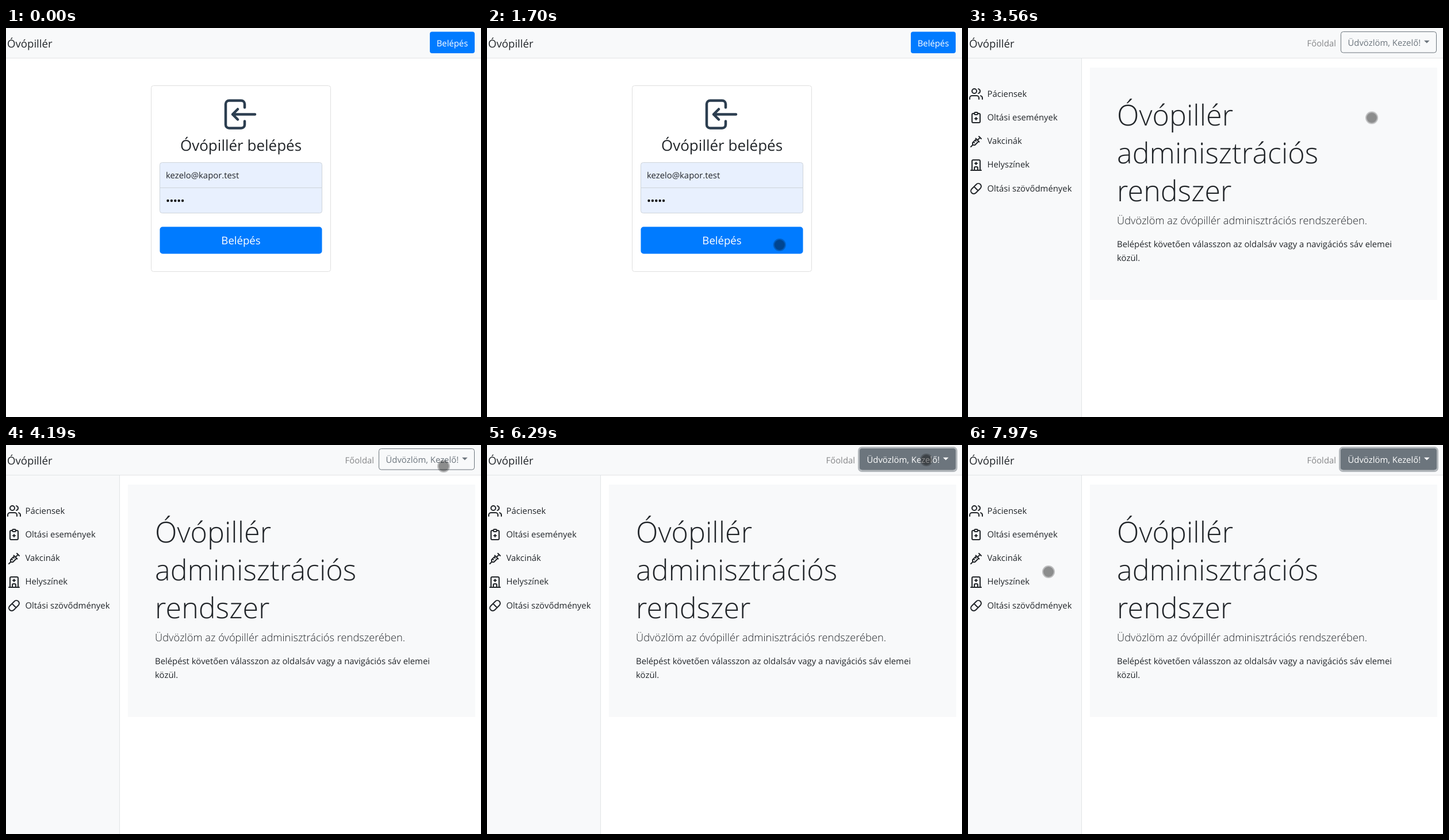
Animation of 826x678 px, one loop 8000 ms. Source, as an HTML page:

```html
<!DOCTYPE html>
<html lang="hu">
<head>
<meta charset="utf-8">
<title>Óvópillér</title>
<style>
  html, body { margin: 0; width: 100%; height: 100%; overflow: hidden; background: #fff; }
  svg { display: block; width: 826px; height: 678px; }
  text { font: 14.86px "Open Sans", "Noto Sans", sans-serif; fill: #212529; text-rendering: geometricPrecision; }
  .mid { text-anchor: middle; }
  .white { fill: #fff; }
  .brand, .big { font-size: 18.6px; }
  .h3 { font-size: 26px; }
  .title { font-size: 50.3px; font-weight: 300; }
  .lead { font-size: 18.3px; font-weight: 300; }
  .link { fill: #858688; }
  .pale { fill: #f8f9fa; }
  .blue { fill: #007bff; }
  .rule { fill: #e2e4e6; }
  .field { fill: #e8f0fe; stroke: #ced4da; }
  .icon { fill: none; stroke: #212529; stroke-width: 2; stroke-linecap: round; stroke-linejoin: round; }

  .login, .home, .menu, .cursor { animation: 8s step-end infinite; }
  .login { animation-name: leave; }
  .home { animation-name: enter; }
  .menu { animation-name: menu; }
  .cursor { animation-name: appear; }
  @keyframes leave { 0% { opacity: 1 } 28%, 100% { opacity: 0 } }
  @keyframes enter { 0% { opacity: 0 } 28%, 100% { opacity: 1 } }
  @keyframes menu { 0% { opacity: 0 } 60.5% { opacity: 1 } 78.625%, 100% { opacity: 0 } }
  @keyframes appear { 0% { opacity: 0 } 10.5%, 100% { opacity: 1 } }

  .fill, .ring, .user { animation: 8s ease-in-out infinite; }
  .fill, .ring { animation-name: press; }
  .user { fill: #6c757d; animation-name: lighten; }
  @keyframes press { 0%, 60.5% { opacity: 0 } 62.2%, 100% { opacity: 1 } }
  @keyframes lighten { 0%, 60.5% { fill: #6c757d } 62.2%, 100% { fill: #fff } }

  .moveX { animation: moveX 8s linear infinite; }
  .moveY { animation: moveY 8s linear infinite; }
  @keyframes moveX {
    0% { transform: translateX(813px) }
    10.5% { transform: translateX(813px); animation-timing-function: cubic-bezier(.333, .33, .667, .764) }
    21.25% { transform: translateX(509px); animation-timing-function: cubic-bezier(.333, .764, .667, 1) }
    25.375% { transform: translateX(473px) }
    36.75% { transform: translateX(473px); animation-timing-function: cubic-bezier(.333, 0, .667, .92) }
    46.5% { transform: translateX(739px); animation-timing-function: cubic-bezier(.333, .584, .667, .886) }
    52.375% { transform: translateX(761px); animation-timing-function: cubic-bezier(.333, .57, .667, 1) }
    56.375% { transform: translateX(764px) }
    82.75% { transform: translateX(764px); animation-timing-function: cubic-bezier(.333, 0, .667, .503) }
    91.75% { transform: translateX(402px); animation-timing-function: cubic-bezier(.333, .294, .667, .765) }
    92.75% { transform: translateX(334px); animation-timing-function: cubic-bezier(.333, .567, .667, 1) }
    99.625%, 100% { transform: translateX(140px) }
  }
  @keyframes moveY {
    0% { transform: translateY(401px) }
    10.5% { transform: translateY(401px); animation-timing-function: cubic-bezier(.333, .25, .667, .44) }
    21.25% { transform: translateY(378px); animation-timing-function: cubic-bezier(.333, .825, .667, 1) }
    25.375% { transform: translateY(372px) }
    36.75% { transform: translateY(372px); animation-timing-function: cubic-bezier(.333, 0, .667, .797) }
    46.5% { transform: translateY(107px); animation-timing-function: cubic-bezier(.333, .463, .667, .875) }
    52.375% { transform: translateY(37px); animation-timing-function: cubic-bezier(.333, .54, .667, 1) }
    56.375% { transform: translateY(26px) }
    82.75% { transform: translateY(26px); animation-timing-function: cubic-bezier(.333, 0, .667, 1) }
    91.75% { transform: translateY(157px); animation-timing-function: cubic-bezier(.333, 0, .667, 1) }
    92.75% { transform: translateY(153px); animation-timing-function: cubic-bezier(.333, 0, .667, 1) }
    99.625%, 100% { transform: translateY(221px) }
  }
</style>
</head>
<body>
<svg viewBox="0 0 826 678">
  <rect class="pale" width="826" height="52"/>
  <rect class="rule" y="52" width="826" height="1"/>
  <text class="brand" x="2" y="33.5">Óvópillér</text>

  <g class="login">
    <rect class="blue" x="737" y="6.5" width="78" height="37.5" rx="4"/>
    <text class="mid white" x="776" y="32">Belépés</text>
    <rect x="252.5" y="100.5" width="312" height="324" rx="4" fill="#fff" stroke="#dfdfdf"/>
    <path class="icon" transform="translate(373 114.5) scale(3)" style="stroke:#2c3e50;stroke-width:1.5"
      d="M14 8v-2a2 2 0 0 0-2-2h-7a2 2 0 0 0-2 2v12a2 2 0 0 0 2 2h7a2 2 0 0 0 2-2v-2M20 12h-13l3-3m0 6l-3-3"/>
    <text class="mid h3" x="408.5" y="213.5">Óvópillér belépés</text>
    <path class="field" d="M267.5 278.5v-40q0-4 4-4h274q4 0 4 4v40z"/>
    <path class="field" d="M267.5 278.5v40q0 4 4 4h274q4 0 4-4v-40z"/>
    <text x="278" y="262">kezelo@kapor.test</text>
    <path d="M281.5 301h27" fill="none" stroke="#111" stroke-width="4.4" stroke-linecap="round" stroke-dasharray="0 6.4"/>
    <rect class="blue" x="267.5" y="346.5" width="282" height="47" rx="4.8"/>
    <text class="mid white big" x="408.5" y="377">Belépés</text>
  </g>

  <g class="home">
    <rect class="pale" y="53" width="197" height="625"/>
    <rect class="rule" x="197" y="53" width="1" height="625"/>
    <g class="icon">
      <path transform="translate(2 103)" d="M17 21v-2a4 4 0 0 0-4-4H5a4 4 0 0 0-4 4v2M5 7a4 4 0 0 1 8 0a4 4 0 0 1-8 0M23 21v-2a4 4 0 0 0-3-3.87M16 3.13a4 4 0 0 1 0 7.75"/>
      <path transform="translate(2 144)" d="M9 5h-2a2 2 0 0 0-2 2v12a2 2 0 0 0 2 2h10a2 2 0 0 0 2-2v-12a2 2 0 0 0-2-2h-2M11 3h2a2 2 0 0 1 0 4h-2a2 2 0 0 1 0-4M10 14h4M12 12v4"/>
      <path transform="translate(2 186)" d="M17 3l4 4M19 5l-4.5 4.5M11.5 6.5l6 6M16.5 11.5l-6.5 6.5h-4v-4l6.5-6.5M7.5 12.5l1.5 1.5M10.5 9.5l1.5 1.5M3 21l3-3"/>
      <path transform="translate(2 227)" d="M3 21h18M5 21v-16a2 2 0 0 1 2-2h10a2 2 0 0 1 2 2v16M9 21v-4a2 2 0 0 1 2-2h2a2 2 0 0 1 2 2v4M10 9h4M12 7v4"/>
      <path transform="translate(2 268)" d="M4.5 12.5l8-8a4.94 4.94 0 0 1 7 7l-8 8a4.94 4.94 0 0 1-7-7M8.5 8.5l7 7"/>
    </g>
    <text x="33.5" y="119.5">Páciensek</text>
    <text x="33.5" y="161">Oltási események</text>
    <text x="33.5" y="201.5">Vakcinák</text>
    <text x="33.5" y="243">Helyszínek</text>
    <text x="33.5" y="284.5">Oltási szövődmények</text>

    <rect class="pale" x="212" y="69" width="604" height="405"/>
    <text class="title" x="259" y="170">Óvópillér</text>
    <text class="title" x="259" y="235.5">adminisztrációs</text>
    <text class="title" x="259" y="301.5">rendszer</text>
    <text class="lead" x="259" y="342">Üdvözlöm az óvópillér adminisztrációs rendszerében.</text>
    <text x="259" y="382">Belépést követően válasszon az oldalsáv vagy a navigációs sáv elemei</text>
    <text x="259" y="406">közül.</text>

    <text class="link" x="589.5" y="32">Főoldal</text>
    <rect class="ring" x="646.5" y="4.5" width="170" height="41" rx="5.5" fill="none" stroke="#b2b7bb" stroke-width="3"/>
    <rect x="648.5" y="6.5" width="166" height="36.5" rx="4" fill="none" stroke="#6c757d"/>
    <rect class="fill" x="648" y="6" width="167" height="37.5" rx="4" fill="#6c757d"/>
    <text class="user" x="660.5" y="31">Üdvözlöm, Kezelő!</text>
    <path class="user" d="M793 21.8h9.6l-4.8 4.8z"/>

    <g class="menu">
      <rect x="619.5" y="46.5" width="195" height="243" rx="4" fill="#fff" stroke="#d9d9d9"/>
      <text x="644" y="76">Páciensek</text>
      <text x="644" y="108">Oltási események</text>
      <rect class="rule" x="620" y="127" width="194" height="1"/>
      <text x="644" y="157">Vakcinák</text>
      <text x="644" y="189">Helyszínek</text>
      <text x="644" y="221">Oltási szövődmények</text>
      <rect class="rule" x="620" y="240" width="194" height="1"/>
      <text x="644" y="270">Kijelentkezés</text>
    </g>
  </g>

  <g class="cursor">
    <g class="moveX">
      <g class="moveY">
        <circle r="11" fill="#000" fill-opacity=".24"/>
        <circle r="9" fill="#000" fill-opacity=".26"/>
      </g>
    </g>
  </g>
</svg>
</body>
</html>
```
